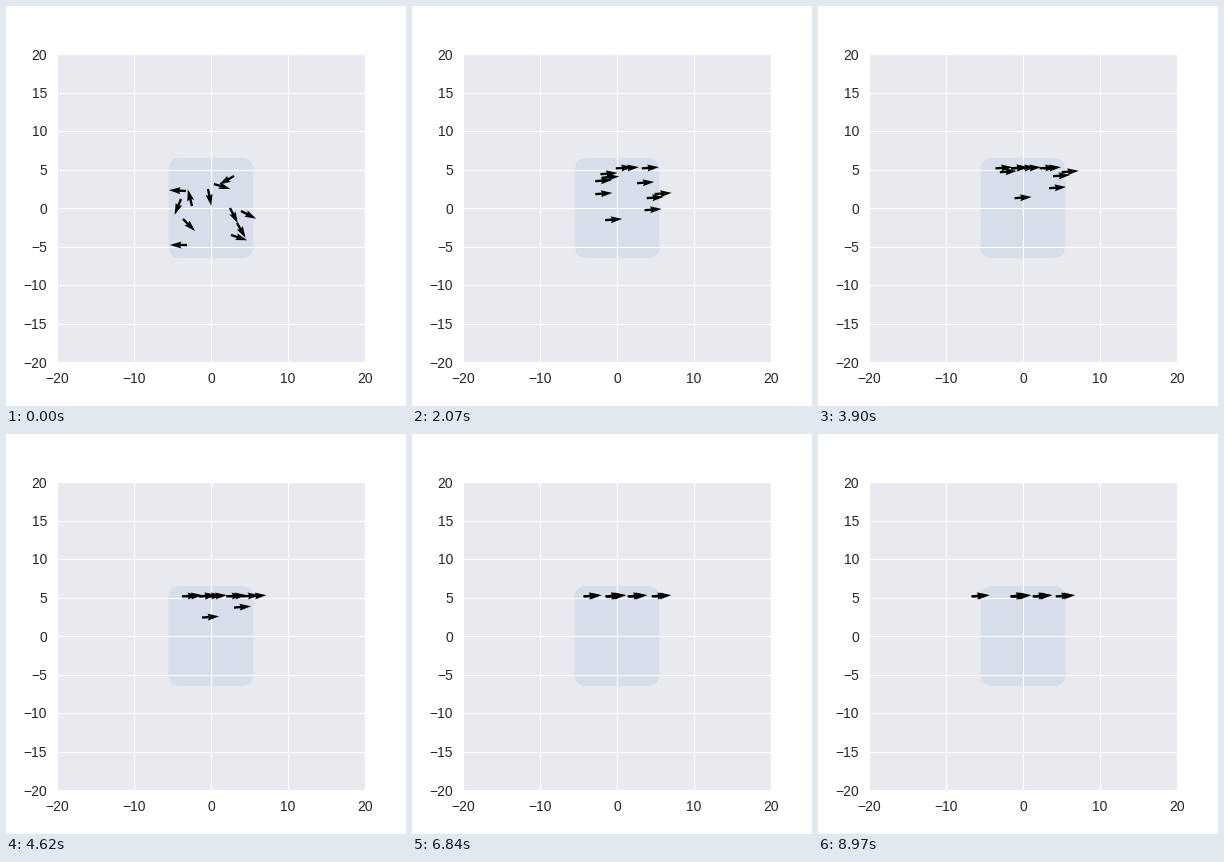
A matplotlib script that plays this animation: 400x400 px, repeating every 9000 ms.

```python
import matplotlib.pyplot as plt
import numpy as np
from matplotlib.animation import FuncAnimation
from matplotlib.patches import FancyBboxPatch

FRAMES, INTERVAL = 300, 30
PX = 7.7                    # pixels per data unit
RISE = 0.36                 # climb per frame, in pixels
CEILING = 39.6              # pixels above centre
HEADING = 4.2               # common direction in degrees
SPREAD, GATHER = 107, 228   # frames when birds have spread out, then grouped
TIGHTEN = 0.25              # how much of its width a group keeps


def bird(x, y, angle, x_spread, wait=0):
    return dict(x=x, y=y, angle=angle, x_spread=x_spread, wait=wait)


# group centre when gathered, centre at the end, members (pixels from centre)
GROUPS = [
    (-33, -51, [bird(-19, 2, 104, -26), bird(-28, -11, -45, -21)]),
    (-10, -11, [bird(-25, 17, 177, -12, wait=32), bird(-30, 9, -112, -12),
                bird(-24, -37, 180, -8), bird(-3, 19, -79, -3),
                bird(3, 24, -17, 3)]),
    (12, 11, [bird(23, 32, -150, 23), bird(19, 0, -63, 18),
              bird(20, -27, -18, 29)]),
    (36, 34, [bird(30, -3, -27, 39, wait=22), bird(26, -15, -60, 29)]),
]

plt.rcParams.update({
    "font.family": "Liberation Sans", "font.size": 10,
    "axes.facecolor": "#E9EAF0", "axes.axisbelow": True,
    "axes.linewidth": 0, "axes.edgecolor": "white",
    "axes.grid": True, "grid.color": "white", "grid.linewidth": 0.8,
    "xtick.color": "0.15", "ytick.color": "0.15",
    "xtick.major.size": 0, "ytick.major.size": 0,
    "xtick.major.pad": 7, "ytick.major.pad": 7,
})


def flock(frame):
    pos, angles = [], []
    push = 2 * np.sin(np.pi * min(frame / SPREAD, 1))
    for gathered, final, birds in GROUPS:
        mean = np.mean([b["x_spread"] for b in birds])
        for b in birds:
            offset = TIGHTEN * (b["x_spread"] - mean)
            x = np.interp(frame, [0, SPREAD, GATHER, FRAMES - 1],
                          [b["x"], b["x_spread"],
                           gathered + offset, final + offset])
            y = b["y"] + RISE * max(0, frame - b["wait"])
            pos.append((x + push, min(y, CEILING)))
            angles.append(HEADING + (b["angle"] - HEADING) * 0.4 ** frame)
    angles = np.radians(angles)
    return np.array(pos) / PX, np.cos(angles), np.sin(angles)


fig = plt.figure(figsize=(4, 4), dpi=100, facecolor="white")
ax = fig.add_subplot()
ax.set(xlim=(-20, 20), ylim=(-20, 20), aspect="equal",
       xticks=range(-20, 21, 10), yticks=range(-20, 21, 5))
ax.add_patch(FancyBboxPatch((-4, -5), 8, 10, boxstyle="round,pad=1.5",
                            facecolor="#D6DEEB", linewidth=0, zorder=0.4))

pos, u, v = flock(0)
arrows = ax.quiver(pos[:, 0], pos[:, 1], u, v, scale=18, width=0.0075,
                   color="black", zorder=3)


def update(frame):
    pos, u, v = flock(frame)
    arrows.set_offsets(pos)
    arrows.set_UVC(u, v)
    return arrows,


anim = FuncAnimation(fig, update, frames=FRAMES, interval=INTERVAL,
                     repeat=True, repeat_delay=0)
plt.show()
```
